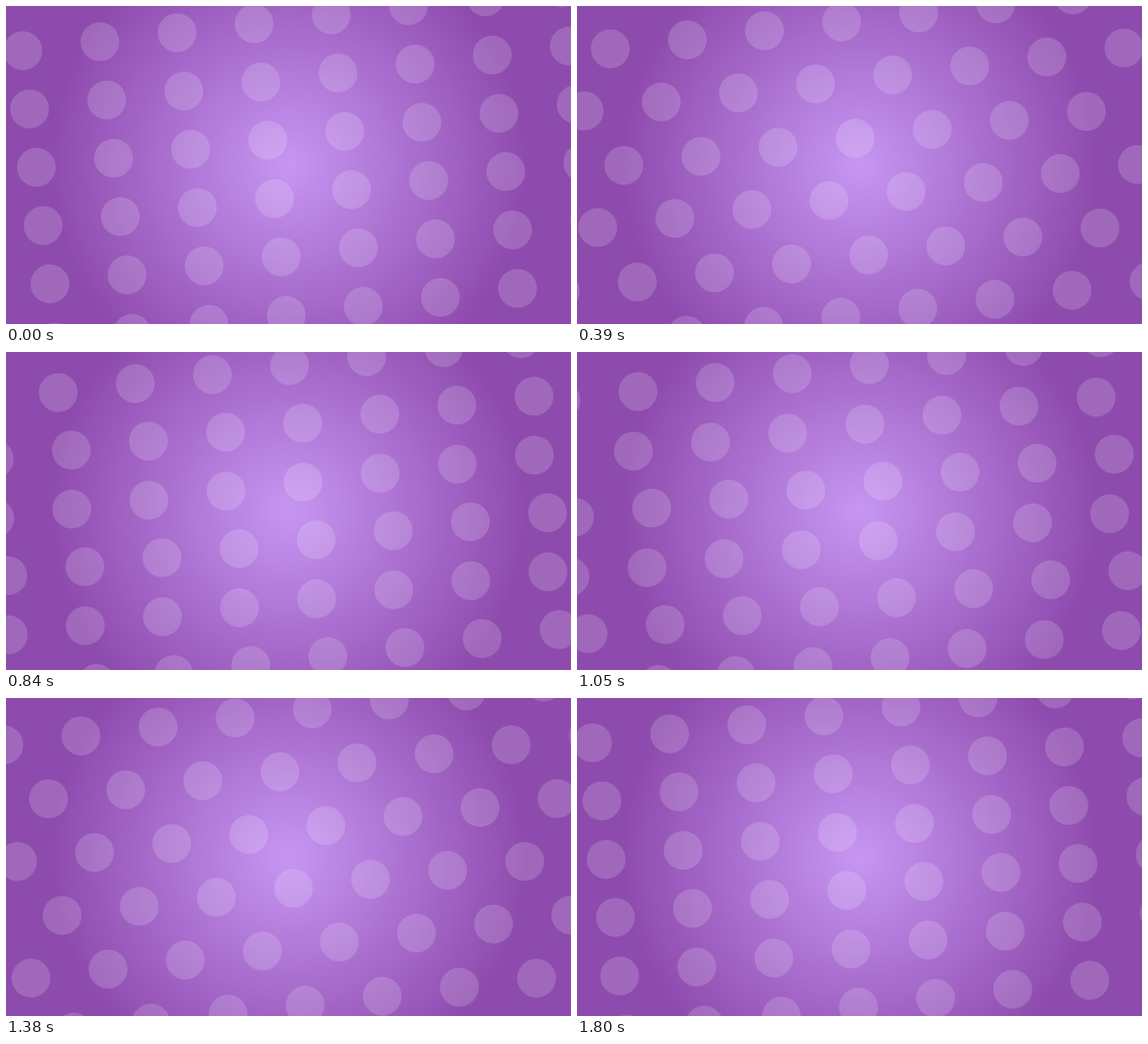
These frames come from a looping animation (998 by 561 pixels, 1830 ms). An HTML page:

```html
<!DOCTYPE html>
<html lang="en">
<head>
<meta charset="utf-8">
<title>Drifting dots</title>
<style>
  html, body {
    margin: 0;
    width: 100%;
    height: 100%;
    overflow: hidden;
  }
  body {
    background: radial-gradient(circle 420px at 499px 280px, #c796f3, #8e4bae);
  }
  svg {
    display: block;
    width: 998px;
    height: 561px;
  }
  circle {
    fill: #fff;
    fill-opacity: .16;
  }
  /* Each row travels one dot spacing per loop; the tiny lead keeps steps clear of their edges. */
  .row {
    --shift: 137.12px;
    animation: drift 1830ms steps(61, end) -4ms infinite;
  }
  .row.left { --shift: -137.12px; }
  @keyframes drift {
    from { transform: translateX(0); }
    to { transform: translateX(var(--shift)); }
  }
</style>
</head>
<body>
<svg viewBox="0 0 998 561">
  <g id="dots" transform="translate(29.7 78.8) rotate(-6.642)"></g>
</svg>
<script>
  const SPACING = 137.12, ROW_GAP = 103.53, RADIUS = 34.28, ROWS = 6;
  const dots = document.getElementById('dots');

  function add(parent, tag, attrs) {
    const el = document.createElementNS('http://www.w3.org/2000/svg', tag);
    for (const name in attrs) el.setAttribute(name, attrs[name]);
    return parent.appendChild(el);
  }

  for (let r = 0; r < ROWS; r++) {
    const row = add(dots, 'g', { class: r % 2 ? 'row left' : 'row' });
    const offset = r === ROWS - 1 ? -3.3 : 0;
    for (let c = -2; c < 10; c++) {
      add(row, 'circle', { cx: c * SPACING + offset, cy: r * ROW_GAP, r: RADIUS });
    }
  }
</script>
</body>
</html>
```
